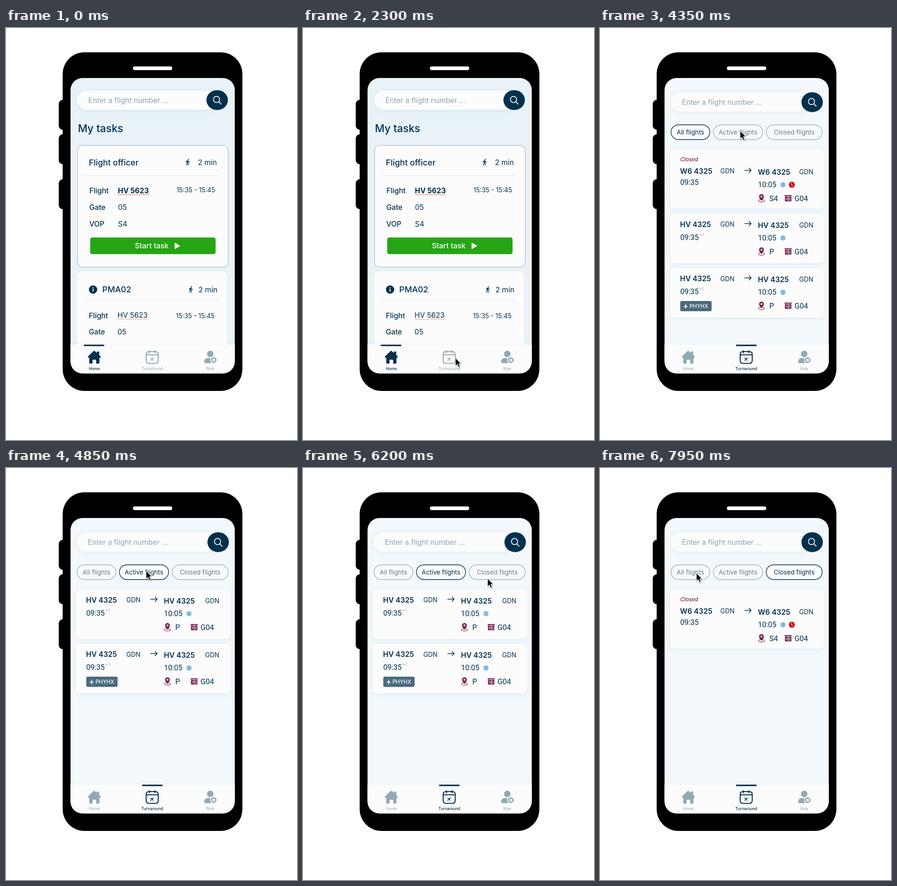
An HTML page for the animation above (8 s loop, 629 by 890 pixels).

```html
<!DOCTYPE html>
<html lang="en">
<head>
<meta charset="utf-8">
<title>Flight tasks</title>
<style>
  html, body { margin: 0; width: 100%; height: 100%; overflow: hidden; background: #fff; }
  svg { display: block; width: 629px; height: 890px; }
  text { font-family: Inter, sans-serif; white-space: pre; }
  .roboto { font-family: Roboto, sans-serif; }
</style>
</head>
<body>
<svg id="stage" viewBox="0 0 629 890"></svg>
<script>
const NAVY = '#03304d', GREY = '#91a9b7', MAROON = '#7a2450', PAPER = '#fcfcfc';
const LOOP = 8000;

const text = (x, y, str, size, { weight = 400, fill = NAVY, more = '' } = {}) =>
  `<text x="${x}" y="${y}" font-size="${size}" font-weight="${weight}" fill="${fill}" ${more}>${str}</text>`;
const roboto = (x, y, str, size = 16, fill = NAVY) =>
  text(x, y, str, size, { fill, more: 'class="roboto"' });
const rect = (x, y, w, h, r, fill, more = '') =>
  `<rect x="${x}" y="${y}" width="${w}" height="${h}" rx="${r}" fill="${fill}" ${more}/>`;
const circle = (x, y, r, fill) => `<circle cx="${x}" cy="${y}" r="${r}" fill="${fill}"/>`;
const fillPath = (d, fill, more = '') => `<path d="${d}" fill="${fill}" ${more}/>`;
const line = (d, stroke, width, more = '') =>
  `<path d="${d}" fill="none" stroke="${stroke}" stroke-width="${width}" stroke-linecap="round" stroke-linejoin="round" ${more}/>`;
const at = (x, y, inner, more = '') => `<g transform="translate(${x} ${y}) ${more}">${inner}</g>`;

// Icons, each centred on its own origin
const plane = (fill, scale) => fillPath(
  'M9.5 4v-2l-8-5v-5.5a1.5 1.5 0 0 0-3 0V-3l-8 5v2l8-2.5V7l-2 1.5V10L0 9l3.5 1V8.5L1.5 7V1.5z',
  fill, `transform="scale(${scale})"`);
const walker = fillPath(
  'M13.5 5.5a2 2 0 1 0 0-4 2 2 0 0 0 0 4zM9.8 8.9 7 23h2.1l1.8-8 2.1 2v6h2v-7.5l-2.1-2 .6-3c1.3 1.5 3.3 2.5 5.5 2.5v-2c-1.9 0-3.5-1-4.3-2.4l-1-1.6c-.6-1-1.5-1.1-2.5-.9L6 8.3V13h2V9.6z',
  NAVY, 'transform="scale(.66) translate(-12.5 -12.25)"');
const snowflake = [0, 60, 120].map(a =>
  line('M0-5.6V5.6M-2-4.6 0-2.6 2-4.6M-2 4.6 0 2.6 2 4.6', '#4fa3dc', 1.1, `transform="rotate(${a})"`)).join('');
const clock = circle(0, 0, 6.5, '#cf0a12') + line('M-.6-3.6V.3L2.2 2.4', '#f6dede', 1.3);
const pin = '<ellipse cy="5.6" rx="6.6" ry="2.7" fill="none" stroke="' + MAROON + '" stroke-width="1.2"/>' +
  fillPath('M0 6C-3 2-5.2-.6-5.2-3.6a5.2 5.2 0 0 1 10.4 0C5.2-.6 3 2 0 6z', MAROON) + circle(0, -3.6, 2, PAPER);
const gate = rect(-7.8, -7, 15.6, 2.2, .6, MAROON) + rect(-7, -3.5, 14, 10, 1, MAROON) +
  line('M-5-5v2M5-5v2', MAROON, 1.2) + line('M-4.5-.5l3.2 3.4M-1.3-.5l-3.2 3.4M2 0h3M2 3h3M.4-2.6v8', PAPER, 1);
const arrow = line('M-7 0H7M2.4-4.6 7 0 2.4 4.6', NAVY, 1.5);

const searchBar = (x, y, cx, textX) =>
  rect(x, y - 20.5, cx - x, 41, 20.5, PAPER, 'filter="url(#soft)"') +
  text(textX, y + 6, 'Enter a flight number ...', 15.7, { fill: '#8fa4b1' }) +
  `<ellipse cx="${cx}" cy="${y}" rx="23.2" ry="21.5" fill="${NAVY}"/>` +
  `<circle cx="${cx - 1.4}" cy="${y - 1.4}" r="6.7" fill="none" stroke="#fff" stroke-width="1.7"/>` +
  line(`M${cx + 3.6} ${y + 3.6}l5 5`, '#fff', 1.8);

function tabs(active) {
  const color = i => i === active ? NAVY : GREY;
  const label = (x, str, i) => text(x, 739, str, 8.5,
    { weight: i === active ? 500 : 400, fill: color(i), more: 'text-anchor="middle"' });
  const house = fillPath('M189 698q1.5-1.3 3 0l4.5 4v-2.4q0-.8.8-.8h3.4q.8 0 .8.8v6.8l3 2.8q1.7 2.2-.8 2.7h-1.7v11q0 2-2 2h-5v-7q0-1.5-1.5-1.5h-5q-1.5 0-1.5 1.5v7h-5q-2 0-2-2v-11h-1.7q-2.5-.5-.8-2.7z', color(0));
  const calendar = line('M309 699h14q6 0 6 6v13q0 6.500-6 6.500h-14q-6 0-6-6.500v-13q0-6 6-6zM303 706h26M310 697v4.500M322 697v4.500', color(1), 2.1) +
    at(316, 715, plane(color(1), .47), 'rotate(45)');
  const teeth = [...Array(8)].map((_, i) =>
    rect(-1.2, -6.8, 2.4, 3, .5, color(2), `transform="rotate(${i * 45})"`)).join('');
  const person = circle(441.5, 704, 7, color(2)) +
    fillPath('M428.500 721q0-8 8-8h9q4 0 5 4l-5 7h-14q-3 0-3-3z', color(2)) +
    at(449, 717.3, circle(0, 0, 8, PAPER) + teeth + circle(0, 0, 5.2, color(2)) + circle(0, 0, 2.9, PAPER));
  return rect(139, 684, 357, 64, 0, PAPER, 'filter="url(#soft)"') +
    rect(active ? 294 : 168, 684, 44.5, 3.3, 1.2, NAVY) +
    house + calendar + person +
    label(191, 'Home', 0) + label(316.3, 'Turnaround', 1) + label(441.5, 'Role', 2);
}

const medium = { weight: 500 };
const homePage = () =>
  rect(139, 107, 357, 640, 0, '#e8f2f7') +
  searchBar(154, 155.7, 456.4, 178) +
  text(155.5, 224.5, 'My tasks', 22.7, medium) +
  rect(154.7, 253.7, 325.6, 262.8, 11, PAPER, 'stroke="#98a9b3"') +
  text(179, 296.6, 'Flight officer', 17.8, medium) +
  at(393.3, 290, walker) + text(414.7, 295.7, '2 min', 15.8) +
  line('M171 319H464', '#e3e8ea', 1.2) +
  text(180.3, 356.8, 'Flight', 15.7, medium) +
  text(241.7, 356.8, 'HV 5623', 15.7, { weight: 700 }) + line('M242.5 360H308.5', '#e9684a', 1.2) +
  text(368.5, 354.6, '15:35 - 15:45', 13.8) +
  text(180, 393, 'Gate', 15.7, medium) + text(242, 393, '05', 15.7) +
  text(180, 429, 'VOP', 15.7, medium) + text(242, 429, 'S4', 15.7) +
  rect(182, 452.5, 271, 36, 4.5, '#26a514') +
  text(278.5, 476.4, 'Start task', 15.9, { weight: 500, fill: '#fff' }) +
  fillPath('M364.500 465.300q0-1.700 1.500-1l9.500 5.700q1 .7 0 1.400l-9.500 5.700q-1.500.7-1.500-1z', '#fff') +
  rect(154, 526, 323.5, 180, 10, PAPER) +
  circle(188.2, 565, 9, NAVY) + circle(188.2, 561.2, 1.2, '#fff') + rect(187.2, 563.6, 2, 6, .5, '#fff') +
  text(208, 571.4, 'PMA02', 17.8, medium) +
  at(400, 565, walker) + text(416, 571, '2 min', 15.8) +
  line('M168 589H464', '#e3e8ea', 1.2) +
  text(179, 626.7, 'Flight', 15.7, medium) +
  text(241, 625.8, 'HV 5623', 15.7) + line('M242 629H307', '#ee9a80', 1.1) +
  text(367.5, 626.5, '15:35 - 15:45', 13.8) +
  text(179, 661.6, 'Gate', 15.7, medium) + text(241, 661.6, '05', 15.7) +
  tabs(0);

function flightCard(top, { closed = false, tag = false }) {
  const dy = closed ? 24 : 0, code = closed ? 'W6 4325' : 'HV 4325', bold = { weight: 600 };
  return at(0, top,
    rect(151.5, 0, 333, closed ? 127 : 106, 9, PAPER, 'filter="url(#soft)"') +
    (closed ? text(173.5, 25, 'Closed', 11.6, { weight: 500, fill: MAROON, more: 'font-style="italic"' }) : '') +
    text(173, 28 + dy, code, 15.7, bold) + text(260, 27.3 + dy, 'GDN', 13.8) +
    at(319.8, 20.5 + dy, arrow) +
    text(341.3, 29.7 + dy, code, 15.7, bold) + text(430.5, 29 + dy, 'GDN', 13.8) +
    roboto(173.5, closed ? 76 : 55.5, '09:35') + (closed ? '' : roboto(215, 47.5, '+1', 9.5, '#9db0c6')) +
    roboto(341.5, 57.2 + dy, '10:05') +
    at(395.5, 51.6 + dy, snowflake) + (closed ? at(414.6, 51.6 + dy, clock) : '') +
    at(349, 80.5 + dy, pin) + roboto(366, 86.7 + dy, closed ? 'S4' : 'P') +
    at(406.7, 81 + dy, gate) + roboto(420.5, 86.7 + dy, 'G04') +
    (tag ? rect(173.5, 70.5, 67.7, 22, 3, '#476a7d') + at(185.3, 81.6, plane('#fff', .5)) +
      text(193.5, 85.7, 'PHYHX', 11.4, { weight: 500, fill: '#fff' }) : ''));
}

const PILLS = [['All flights', 153.5, 84], ['Active flights', 245.2, 106.3], ['Closed flights', 359.3, 121]];
const flightsPage = (selected, cards) =>
  rect(139, 107, 357, 640, 0, '#f2f8fb') +
  searchBar(153, 160.2, 458.6, 177) +
  PILLS.map(([label, x, w], i) => {
    const on = i === selected;
    return rect(x, 209.2, w, 31.8, 15.9, on ? PAPER : '#f7fafc', `stroke="${on ? NAVY : '#9db3c0'}" stroke-width="1.4"`) +
      text(x + w / 2, 230.2, label, 13.6, { fill: on ? NAVY : '#617e90', more: 'text-anchor="middle"' });
  }).join('') + cards + tabs(1);

const closedCard = flightCard(263, { closed: true });
const plainAndTagged = top => flightCard(top, {}) + flightCard(top + 117.3, { tag: true });
const pages = [
  [0, homePage()],
  [3250, flightsPage(0, closedCard + plainAndTagged(402))],
  [4850, flightsPage(1, plainAndTagged(263))],
  [6500, flightsPage(2, closedCard)],
];

const stage = document.getElementById('stage');
stage.innerHTML = `
  <defs>
    <clipPath id="screen">${rect(139.5, 108, 355, 638.3, 26, '#000')}</clipPath>
    <filter id="soft" x="-10%" y="-30%" width="120%" height="170%">
      <feDropShadow dx="0" dy="2" stdDeviation="5" flood-color="#4f86a5" flood-opacity=".11"/>
    </filter>
    <filter id="cursorShadow" x="-50%" y="-50%" width="220%" height="220%">
      <feDropShadow dx="1" dy="2" stdDeviation="1.3" flood-opacity=".3"/>
    </filter>
  </defs>` +
  [155, 229.5, 326.5].map(y => rect(114, y, 24, 65, 9, '#000')).join('') +
  rect(122.5, 52.5, 388.5, 731.5, 47, '#000') + rect(274.3, 83, 85, 8, 4, '#fff') +
  `<g clip-path="url(#screen)">
    ${pages.map(([, page]) => `<g class="page">${page}</g>`).join('')}
    <g id="cursor"><path d="M0 0V16.800L3.900 13.200 6.700 19.700 9.600 18.400 6.900 12.100H12z"
      fill="#050505" stroke="#fff" stroke-width=".9" filter="url(#cursorShadow)"/></g>
  </g>`;

const pageNodes = [...stage.querySelectorAll('.page')];
const cursor = document.getElementById('cursor');

// Cursor moves: start time, end time, target x, target y
const HIDDEN = [496, 750];
const MOVES = [
  [1650, 2300, 329.5, 713],
  [3700, 4350, 303, 222.5],
  [5150, 5600, 387.5, 247],
  [5600, 6000, 389.5, 246.5],
  [6000, 6200, 399, 239],
  [7650, 7960, 208, 227],
];
const ease = p => (1 - Math.cos(Math.PI * p)) / 2;

function draw(now) {
  const t = now % LOOP;
  const current = pages.filter(([start]) => start <= t).length - 1;
  pageNodes.forEach((node, i) => node.style.display = i === current ? '' : 'none');

  let [x, y] = HIDDEN;
  for (const [start, end, tx, ty] of MOVES) {
    const p = ease(Math.min(1, Math.max(0, (t - start) / (end - start))));
    x += (tx - x) * p;
    y += (ty - y) * p;
  }
  cursor.setAttribute('transform', `translate(${x} ${y})`);
  cursor.style.display = t < MOVES[0][0] ? 'none' : '';
  requestAnimationFrame(draw);
}
draw(performance.now());
</script>
</body>
</html>
```
